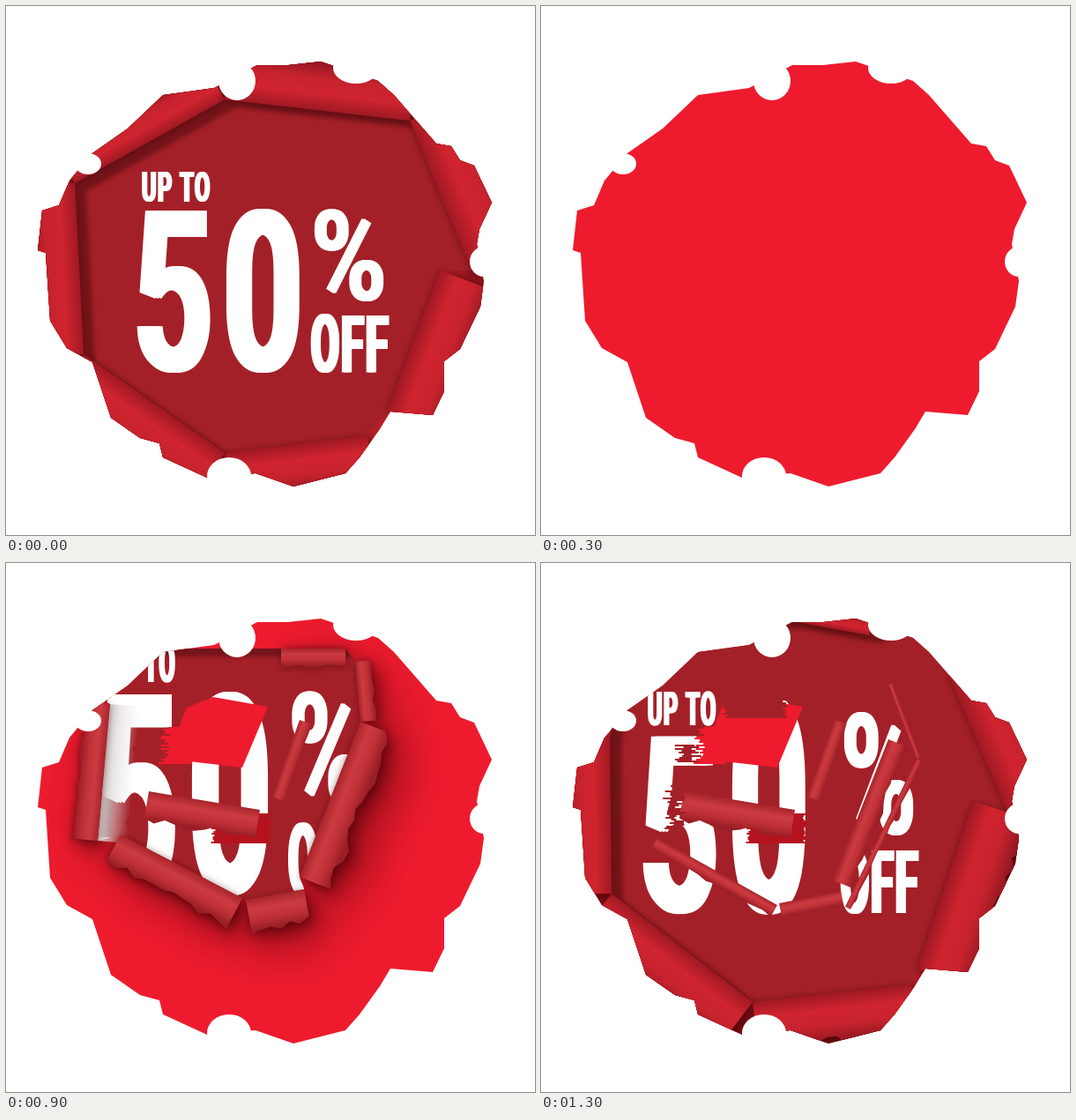
Write an HTML page with a canvas that moves like this. It is 600 px wide and 600 px high and loops after 1500 ms.

```html
<!DOCTYPE html>
<html lang="en">
<head>
<meta charset="utf-8">
<title>Up to 50% off</title>
<style>
html, body { margin: 0; width: 100%; height: 100%; overflow: hidden; background: #fff; }
canvas { display: block; }
</style>
</head>
<body>
<canvas id="stage" width="600" height="600"></canvas>
<script>
const ctx = document.getElementById('stage').getContext('2d');
const RED = '#ee1b2e', DARK = '#a42028', DEEP = '#74141a', WHITE = '#fff';
const RIM = ['#a01923', '#d0242f', '#c6222d', '#8f1820'];
const CURL = ['#a9242b', '#cb3b41', '#c03037', '#9a1e26'];
const PALE = ['#d8d2d2', 'rgba(225,220,220,.5)', 'rgba(225,220,220,0)'];
const LOOP = 1500;

// Edge of the paper disc, and the round bites [x, y, rx, ry] taken out of it
const disc = path(`285,67 320,67 357,63 422,85 440,101 488,156 505,159 515,175 531,181 551,223
  537,253 534,270 542,312 538,341 515,389 497,403 497,437 484,464 436,460 424,480 401,512
  385,530 326,545 283,530 228,535 178,512 174,496 152,490 119,467 98,404 69,388 50,357
  45,280 36,277 41,232 60,226 72,198 98,167 138,139 178,101 236,93`
  .trim().split(/\s+/).map(point => point.split(',')));
const bites = [[397, 70, 26, 18], [262, 85, 21, 22], [93, 179, 15, 12], [542, 290, 16, 17], [253, 533, 25, 21]];

function path(points) {
  const shape = new Path2D();
  for (const [x, y] of points) shape.lineTo(x, y);
  shape.closePath();
  return shape;
}

function noise(n) {
  const v = Math.sin(n * 12.9898) * 43758.5453;
  return v - Math.floor(v);
}

function withShadow(color, blur, dx, dy, draw) {
  ctx.save();
  ctx.shadowColor = color;
  ctx.shadowBlur = blur;
  ctx.shadowOffsetX = dx;
  ctx.shadowOffsetY = dy;
  draw();
  ctx.restore();
}

// Rolled paper on the left of the line from start to end, with a torn far edge
function roll(tones, x0, y0, x1, y1, width) {
  const length = Math.hypot(x1 - x0, y1 - y0);
  const nx = (y1 - y0) / length, ny = (x0 - x1) / length;
  const points = [[x0, y0], [x1, y1]];
  const steps = Math.ceil(length / 12);
  for (let i = 0; i <= steps; i++) {
    const t = 1 - i / steps, reach = width * (.85 + .3 * noise(x0 + y1 + i));
    points.push([x0 + (x1 - x0) * t + nx * reach, y0 + (y1 - y0) * t + ny * reach]);
  }
  const shade = ctx.createLinearGradient(x0, y0, x0 + nx * width, y0 + ny * width);
  tones.forEach((tone, i) => shade.addColorStop(i / (tones.length - 1), tone));
  ctx.fillStyle = shade;
  ctx.fill(path(points));
}

function rolls(tones, corners) {
  corners.forEach(([x, y, width], i) => {
    const [endX, endY] = corners[(i + 1) % corners.length];
    if (width) roll(tones, x, y, endX, endY, width);
  });
}

// Rows with a frayed left and right end
function frayed(left, right, top, bottom, fray, fill) {
  ctx.fillStyle = fill;
  for (let y = top; y < bottom; y += 2) {
    const x = left + fray * noise(y);
    ctx.fillRect(x, y, right - fray * noise(y + 99) - x, 2);
  }
}

function word(text, x, y, height, width, bold, spacing = 0) {
  const condense = width / height;
  ctx.save();
  ctx.translate(x, y);
  ctx.scale(condense, 1);
  ctx.font = `700 ${height}px Roboto, "Liberation Sans", sans-serif`;
  ctx.letterSpacing = spacing + 'px';
  ctx.fillStyle = WHITE;
  for (const dx of [-bold, 0, bold]) ctx.fillText(text, dx / condense, 0);
  ctx.restore();
}

// gap moves the right-hand part away, tall raises the zero and the percent sign
function offer({ sx = 1, sy = 1, dx = 0, dy = 0, gap = 0, tall = 1 }) {
  ctx.save();
  ctx.transform(sx, 0, 0, sy, dx, dy);
  word('UP TO', 154, 222, 49, 25, 1.3, 3);
  word('5', 144, 414, 254, 158, 3.5);
  word('0', 246, 414, 254 * tall, 158, 3.5);
  word('%', 346 + gap, 334, 143 * tall, 116, 1.5);
  word('OFF', 346 + gap, 415, 91, 46, 2.2, 5);
  ctx.restore();
}

function hole(corners, text) {
  const opening = path(corners);
  const around = new Path2D('M-99-99H699V699H-99Z');
  around.addPath(opening);
  ctx.save();
  ctx.clip(opening);
  ctx.fillStyle = DARK;
  ctx.fillRect(0, 0, 600, 600);
  withShadow(DEEP, 5, 13, 9, () => ctx.fill(around, 'evenodd'));
  if (text) offer(text);
  ctx.restore();
}

function tear({ ground, tones = CURL, corners = [], text, extras }) {
  ctx.fillStyle = ground;
  ctx.fillRect(0, 0, 600, 600);
  for (const spread of [20, 55])
    withShadow('rgba(70,0,5,.7)', spread, spread / 3, spread / 3, () => rolls(tones, corners));
  hole(corners, text);
  if (extras) extras();
  withShadow('rgba(60,0,0,.5)', 8, 0, 1, () => rolls(tones, corners));
}

function scrap() {
  ctx.fillStyle = RED;
  ctx.fill(path([[205, 164], [235, 152], [297, 163], [268, 232], [182, 222]]));
  frayed(172, 215, 186, 228, 14, RED);
}

function firstScraps() {
  scrap();
  frayed(232, 303, 284, 318, 6, '#b5141f');
  roll(CURL, 288, 280, 162, 259, 32);
  roll(CURL, 333, 178, 302, 265, 15);
}

function allScraps() {
  firstScraps();
  frayed(206, 280, 140, 176, 6, DARK);
  frayed(138, 165, 250, 334, 14, DARK);
  frayed(148, 184, 206, 226, 14, DARK);
  roll(CURL, 268, 388, 132, 312, 14);
  roll(CURL, 340, 372, 270, 386, 16);
  roll(CURL, 394, 200, 331, 360, 22);
}

function lastScraps() {
  allScraps();
  roll(CURL, 394, 138, 426, 222, 5);
  roll(CURL, 426, 222, 345, 390, 7);
}

function paleFold() {
  roll(PALE, 118, 160, 104, 315, 34);
  firstScraps();
}

const shrinking = { sy: 1.1, dx: -33, dy: -60, gap: 27, tall: 1.22 };

// Corners run clockwise as [x, y, width of the roll on the edge that starts here]
const scenes = [
  { at: 0, ground: '#c4222d', tones: RIM, text: {},
    corners: [[78, 201, 45], [248, 106, 55], [458, 130, 75], [528, 300, 0], [492, 300, 66],
      [432, 460, 0], [410, 487, 55], [248, 507, 62], [88, 395, 55]] },
  { at: 300, ground: RED },
  { at: 500, ground: RED, extras: scrap,
    corners: [[182, 190, 0], [235, 152, 0], [297, 163, 14], [268, 232, 14], [182, 222, 0]] },
  { at: 700, ground: RED, text: { sx: 1.04, sy: 1.247, dx: -49, dy: -207 }, extras: scrap,
    corners: [[154, 137, 0], [352, 137, 0], [346, 152, 26], [302, 265, 0], [290, 282, 32],
      [165, 258, 0], [152, 243, 20]] },
  { at: 900, ground: RED, text: { sx: 1.04, sy: 1.247, dx: -49, dy: -142, gap: 9 }, extras: paleFold,
    corners: [[118, 160, 0], [80, 140, 0], [130, 97, 0], [312, 97, -20], [385, 97, 0], [396, 112, 18],
      [402, 180, 36], [333, 356, 0], [338, 370, 36], [272, 382, 0], [268, 380, 34], [130, 308, 0], [104, 315, 28]] },
  { at: 1100, ground: RED, text: shrinking, extras: allScraps,
    corners: [[78, 198, 45], [228, 98, 0], [270, 98, 45], [398, 120, 32], [430, 235, 50], [345, 399, 0],
      [362, 403, 48], [258, 420, 0], [245, 434, 55], [115, 358, 40], [78, 338, 45]] },
  { at: 1300, ground: '#c4222d', tones: RIM, text: shrinking, extras: lastScraps,
    corners: [[78, 198, 0], [100, 60, 0], [285, 66, 18], [372, 82, 0], [420, 60, 0], [462, 127, 75], [530, 285, 0],
      [490, 270, 66], [427, 460, 0], [420, 478, 55], [240, 498, 62], [80, 375, 55]] }
];

function render(time) {
  ctx.fillStyle = WHITE;
  ctx.fillRect(0, 0, 600, 600);
  ctx.save();
  ctx.clip(disc);
  tear(scenes.findLast(scene => time >= scene.at));
  ctx.restore();
  ctx.fillStyle = WHITE;
  for (const [x, y, rx, ry] of bites) {
    ctx.beginPath();
    ctx.ellipse(x, y, rx, ry, 0, 0, 2 * Math.PI);
    ctx.fill();
  }
}

const begin = performance.now();
function tick() {
  render((performance.now() - begin) % LOOP);
  requestAnimationFrame(tick);
}
tick();
</script>
</body>
</html>
```
